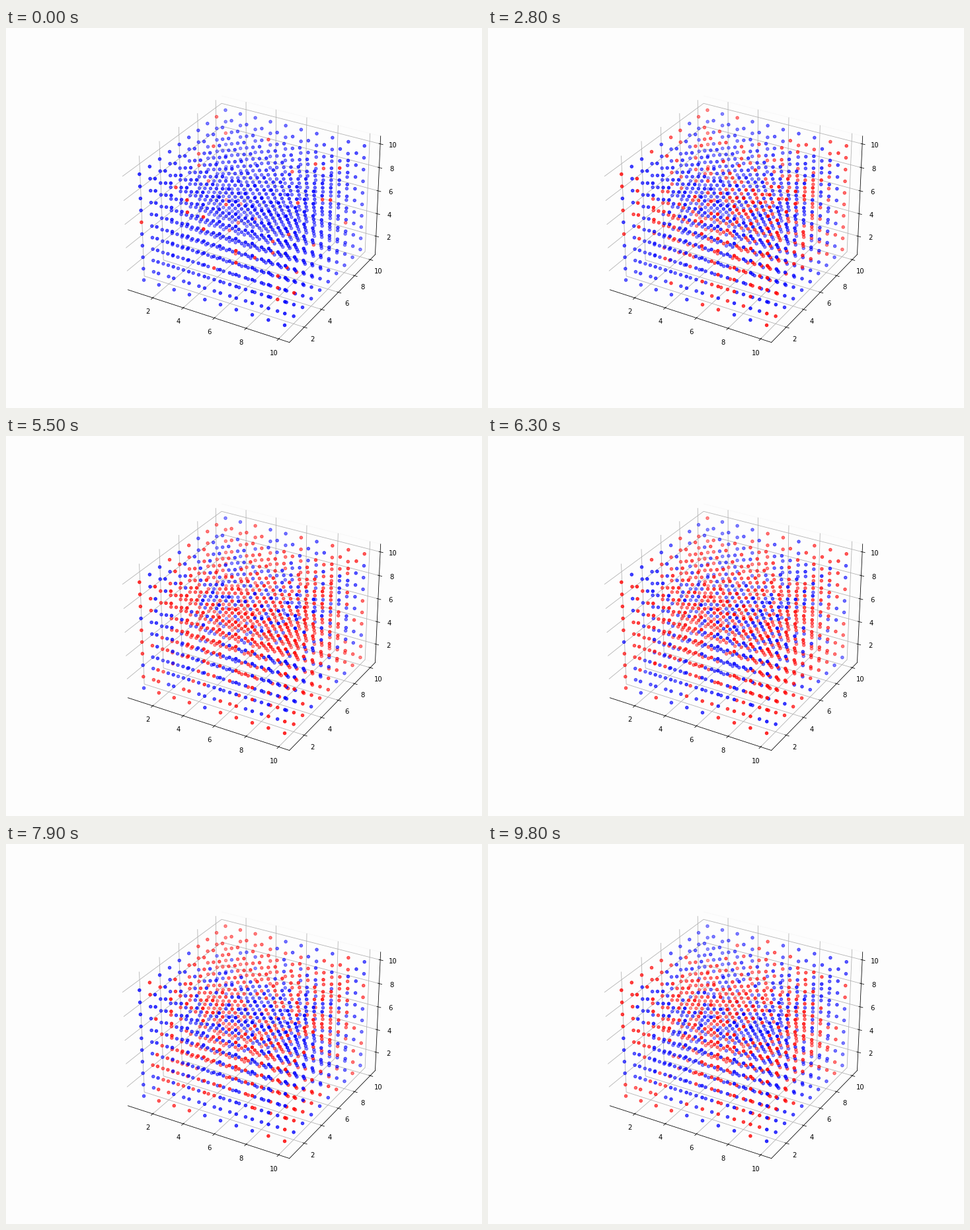
A matplotlib script that plays this animation: 720 px wide and 576 px high, repeating every 9.9 s.

```python
import matplotlib.pyplot as plt
import numpy as np
from matplotlib.animation import FuncAnimation

SIZE = 10
FRAMES = 99
TEMPERATURE = 5.0
TRIALS = 500
BLUE, RED = (0, 0, 1, 1), (1, 0, 0, 1)


def red_share(i):
    """Rise from all blue to an even mix, with one redder spell midway."""
    rise = 0.48 * (1 - np.exp(-i / 20))
    return rise + 0.15 * np.exp(-((i - 55) / 14) ** 2)


def sweep(spins, share, rng):
    """Metropolis steps with a weak field that steers the red share."""
    total = spins.sum()
    sites = rng.integers(0, SIZE, (TRIALS, 3)).tolist()
    for (x, y, z), chance in zip(sites, rng.random(TRIALS)):
        s = spins[x, y, z]
        near = (spins[x - 1, y, z] + spins[(x + 1) % SIZE, y, z]
                + spins[x, y - 1, z] + spins[x, (y + 1) % SIZE, z]
                + spins[x, y, z - 1] + spins[x, y, (z + 1) % SIZE])
        field = 4 * (2 * share - 1 - total / SIZE**3)
        cost = 2 * s * (near + field)
        if cost <= 0 or chance < np.exp(-cost / TEMPERATURE):
            spins[x, y, z] = -s
            total -= 2 * s


def simulate():
    rng = np.random.default_rng(5)
    spins = -np.ones((SIZE, SIZE, SIZE), dtype=int)
    history = []
    for i in range(FRAMES):
        sweep(spins, red_share(i), rng)
        history.append(spins.ravel() > 0)
    return history


history = simulate()

fig = plt.figure(figsize=(10, 8), dpi=72, facecolor="#fdfdfd")
fig.subplots_adjust(left=0.125, right=0.9, bottom=0.125, top=0.88)
ax = fig.add_subplot(projection="3d", facecolor="none")

x, y, z = np.indices((SIZE, SIZE, SIZE)).reshape(3, -1) + 1
dots = ax.scatter(x, y, z, s=20, c=[BLUE] * SIZE**3)

# Half a cell of padding plus a slim border around the lattice.
pad = 0.05 * (SIZE - 1)
border = 1.1 * (SIZE - 1) / 48
limits = (1 - pad - border, SIZE + pad + border)
ax.set(xlim=limits, ylim=limits, zlim=limits)
for axis in (ax.xaxis, ax.yaxis, ax.zaxis):
    axis.set_ticks(range(2, SIZE + 1, 2))
    axis.pane.set_visible(False)

# Only the back wall shows a faint outline.
ax.yaxis.pane.set(visible=True, facecolor="none", edgecolor="#f4f4f4")


def update(i):
    dots.set_facecolor(np.where(history[i][:, None], RED, BLUE))
    return [dots]


anim = FuncAnimation(fig, update, frames=FRAMES, interval=100,
                     repeat=True, repeat_delay=0, blit=False)
plt.show()
```
